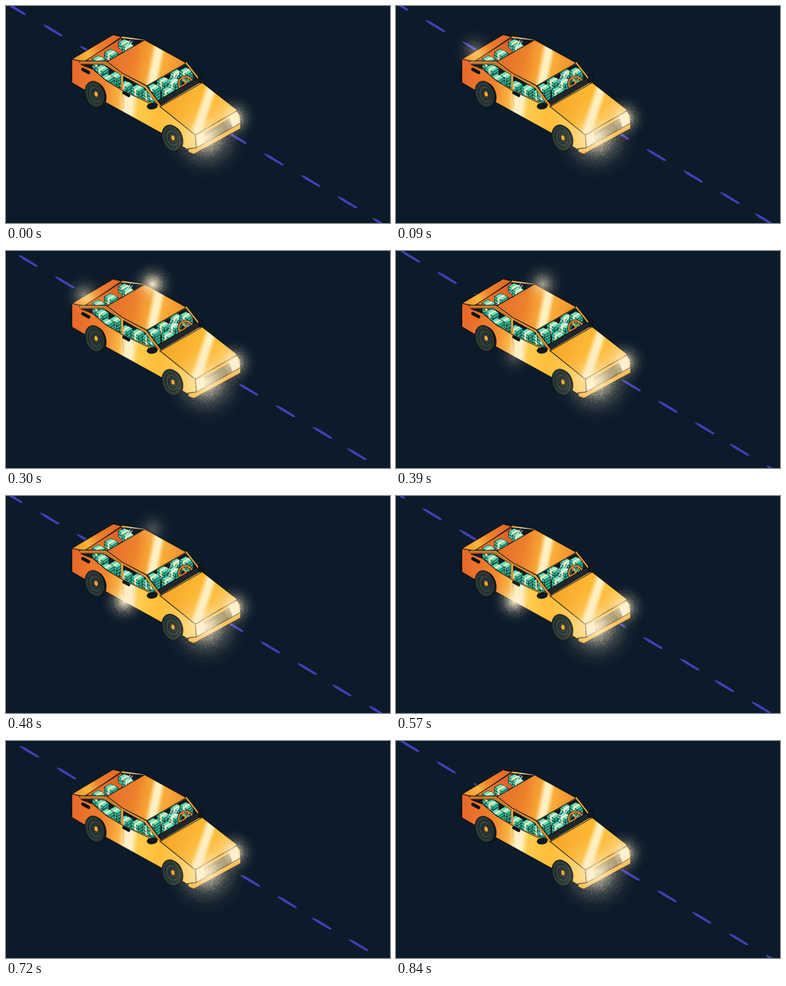
Recreate the animation shown at these times as an HTML page with a canvas. Size 720x407 px, loop 0.87 s.

```html
<!DOCTYPE html>
<html>
<head>
<meta charset="utf-8">
<style>
html, body { margin: 0; width: 100%; height: 100%; overflow: hidden; background: #0c1b2a; }
canvas { display: block; }
</style>
</head>
<body>
<canvas id="stage" width="720" height="407"></canvas>
<script>
const LOOP = 870, STEP = 30, INK = '#0b1015';
const stage = document.getElementById('stage').getContext('2d');

function layer(w, h) {
  const canvas = document.createElement('canvas');
  canvas.width = w;
  canvas.height = h;
  return canvas.getContext('2d');
}

let seed = 7;
function random() {
  seed = (seed * 16807) % 2147483647;
  return seed / 2147483647;
}

// Soft light with a grainy edge
function makeGlow(r) {
  const g = layer(r * 2, r * 2);
  const soft = g.createRadialGradient(r, r, 0, r, r, r);
  soft.addColorStop(0, 'rgba(255,243,212,.85)');
  soft.addColorStop(.25, 'rgba(255,238,200,.5)');
  soft.addColorStop(.5, 'rgba(245,226,188,.17)');
  soft.addColorStop(.75, 'rgba(240,220,180,.04)');
  soft.addColorStop(1, 'rgba(240,220,180,0)');
  g.fillStyle = soft;
  g.fillRect(0, 0, r * 2, r * 2);
  for (let i = 0; i < r * r * .8; i++) {
    const d = random() ** .8, a = random() * Math.PI * 2;
    g.fillStyle = `rgba(255,238,200,${.5 * (1 - d) ** 1.9})`;
    g.fillRect(Math.round(r + Math.cos(a) * d * r), Math.round(r + Math.sin(a) * d * r), 1, 1);
  }
  return g.canvas;
}

const car = layer(720, 407);

function gradient(x0, y0, x1, y1, stops) {
  const g = car.createLinearGradient(x0, y0, x1, y1);
  for (const [at, color] of stops) g.addColorStop(at, color);
  return g;
}

function shape(d, fill, stroke = INK, width = 1.3) {
  const path = new Path2D(d);
  if (fill) {
    car.fillStyle = fill;
    car.fill(path);
  }
  if (stroke) {
    car.strokeStyle = stroke;
    car.lineWidth = width;
    car.stroke(path);
  }
}

function oval(x, y, rx, ry, angle, fill, stroke = INK, width = 1.3) {
  car.beginPath();
  car.ellipse(x, y, rx, ry, angle, 0, Math.PI * 2);
  car.fillStyle = fill;
  car.fill();
  car.strokeStyle = stroke;
  car.lineWidth = width;
  car.stroke();
}

function wheel(x, y) {
  oval(x + 4, y + 1, 16.5, 24, -.3, '#18211f');
  oval(x, y, 17.5, 25, -.3, '#2b3936');
  oval(x + 1, y, 12, 17, -.3, '#34423e', INK, 1);
  oval(x + 2, y, 8, 11, -.3, '#2b3936', INK, 1);
  oval(x + 2.5, y - .5, 3.8, 5.5, -.3, '#f6a52f', INK, 1);
}

function cash(x, y, layers) {
  car.save();
  car.translate(x, y + layers * 5.5);
  for (let i = 0; i < layers; i++) {
    car.translate(0, -5.5);
    shape('M-12 0L2 8V13.5L-12 5.5Z', '#3cc9a3', INK, .8);
    shape('M2 8L13 1V6.5L2 13.5Z', '#2fae8e', INK, .8);
    shape('M-12 0L-1 -6L13 1L2 8Z', '#63e3be', INK, .8);
    shape('M-6.5 3L4.5 -3.2L8 -1.5L-3 5V10.5L-6.5 8.5Z', '#f8e9be', null);
  }
  car.restore();
}

function drawCar() {
  car.lineJoin = car.lineCap = 'round';
  const side = gradient(124, 150, 357, 173, [[0, '#e7682a'], [.25, '#f0822d'], [.38, '#fab343'],
    [.44, '#fff0c4'], [.49, '#fff0c4'], [.54, '#ffcb4c'], [.72, '#ffbe3a'], [1, '#ffd268']]);
  const roof = gradient(190, 80, 340, 110, [[0, '#e36c2a'], [.35, '#ec812c'], [.53, '#f7a434'],
    [.59, '#fff0c0'], [.65, '#fff0c0'], [.7, '#faae39'], [1, '#ee8a2e']]);
  const hood = gradient(300, 180, 430, 223, [[0, '#f7a82d'], [.43, '#fdb932'], [.5, '#fff0c0'],
    [.56, '#fff0c0'], [.62, '#ffbc36'], [1, '#ffd076']]);
  const trunk = gradient(130, 100, 205, 55, [[0, '#f5942e'], [.3, '#fdb63c'], [.55, '#ee812d'], [1, '#e26a29']]);

  // Shell
  shape('M120.5 121L126 124V142L121 137Z', '#10171b');
  shape('M123.5 99L201 53L260 62L338 105L361 133L368 142L432 193L439 204L440 228L352 276L341 269L292 238L187 180L123.5 143Z', side);
  shape('M123.5 99L201 53L217 57L148 104Z', trunk);

  // Windows and cargo
  const windows = [
    'M149 102L215 60L258 64L187 104Z',
    'M142 109L184 109L215 129L216 154L189 139L163 117Z',
    'M220 131L260 153L284 185L267 178L220 157Z',
    'M263 151L336 109L366 141L289 186Z'
  ];
  shape(windows[0], gradient(165, 100, 245, 62, [[0, '#ed7b2c'], [.7, '#d95f29'], [.72, '#10191f'], [1, '#10191f']]));
  for (const w of windows.slice(1)) shape(w, '#121b20');
  car.save();
  const glass = new Path2D();
  for (const w of windows) glass.addPath(new Path2D(w));
  car.clip(glass);
  for (const [x, y, n] of [
    [223, 67, 2], [230, 74, 2], [197, 86, 2], [174, 98, 4], [180, 115, 2],
    [206, 128, 3], [190, 132, 2], [225, 145, 3], [247, 152, 3], [268, 160, 4],
    [320, 123, 3], [338, 120, 3], [295, 137, 3], [316, 139, 3], [277, 150, 4], [304, 156, 3]
  ]) cash(x, y, n);
  oval(337, 145, 13, 13, 0, 'rgba(0,0,0,0)', INK, 5);
  oval(337, 145, 13, 13, 0, 'rgba(0,0,0,0)', '#f08b2e', 2.8);
  shape('M337 145L331 134M337 145L343 134M337 145L326 151', null, '#f08b2e', 2);
  shape('M286 176L361 133L370 143L289 188Z', '#20262a');
  shape('M305 151L321 122M311 146L324 125M303 143L312 127M226 74L233 63M231 74L237 65', null, 'rgba(255,255,255,.75)', 1.5);
  car.restore();

  // Roof, pillars and hood
  shape('M187 105L260 63L338 106L262 150L218 128Z', roof);
  shape('M139 104L187 104L218 127L263 150L290 187', null, INK, 4.5);
  shape('M139 104.5L187 104.5L218 127.5L262 150.5L289.5 187', null, '#f39530', 2.7);
  shape('M218 129V157', null, '#f6a23a', 3);
  shape('M338 106L363 138', null, INK, 4.5);
  shape('M338 106L363 138', null, '#f9a733', 2.7);
  shape('M140 109L163 118L189 140L219 158L268 181', null);
  shape('M218 158L221 191', null, 'rgba(120,65,20,.35)', .8);
  shape('M289 188L368 143L432 193Q434 196 430 198L357 240Q354 241 351 238Z', hood);

  // Nose
  shape('M355 241L432 196L439 204L440 222L357 269Z', '#ffc04a');
  shape('M372 238L419 211L425 225L375 255Z', '#a89567', INK, .7);
  for (let i = 1; i < 6; i++)
    shape(`M${372 + i * .5} ${238 + i * 2.8}L${419 + i} ${211 + i * 2.4}`, null, '#4b4a40', 1);
  shape('M357 242L371 236L375 258L359 266Z', '#fff6dc', null);
  shape('M418 208L434 198L438 217L425 227Z', '#fff6dc', null);
  shape('M341 267L357 265L440 219V229L352 277L342 273Z', '#fcb63b');

  // Fittings
  shape('M144 118L155 124M221 162L230 167', null, INK, 6);
  oval(274, 187, 9.5, 5.5, -.1, '#10191f');
  oval(365, 136, 4.5, 7.5, .3, '#10191f');
  wheel(166.5, 165);
  wheel(310.5, 247);
}

function drawRoad(t) {
  stage.fillStyle = '#0c1b2a';
  stage.fillRect(0, 0, 720, 407);
  stage.fillStyle = stage.strokeStyle = '#423fb9';
  stage.lineJoin = 'round';
  const dash = new Path2D('M1 0L10 3.5L35 19L36 21L33 21.5L9 7.5L1 1.5Z');
  for (let k = -8; k < 7; k++) {
    const along = k * 69 - t * .157;
    stage.save();
    stage.translate(484 + along - (k > 2 ? 4 : 0), 277 + along * .584);
    stage.fill(dash);
    stage.stroke(dash);
    stage.restore();
  }
}

const small = makeGlow(46), wide = makeGlow(82);

function shine(sprite, x, y, alpha = 1) {
  stage.globalAlpha = alpha;
  stage.drawImage(sprite, Math.round(x - sprite.width / 2), Math.round(y - sprite.height / 2));
  stage.globalAlpha = 1;
}

// Rises from start to peak, holds until fade, gone at end
const pulse = (t, start, peak, fade, end) =>
  Math.max(0, Math.min(1, (t - start) / (peak - start), (end - t) / (end - fade)));

function frame(now) {
  const t = Math.floor(now % LOOP / STEP) * STEP;
  const bob = .8 * Math.cos(t / LOOP * Math.PI * 2);
  drawRoad(t);
  stage.drawImage(car.canvas, 0, bob);
  shine(wide, 375, 245 + bob);
  shine(small, 427, 209 + bob);
  shine(small, 147, 83, pulse(t, 60, 150, 210, 390));
  shine(small, 275, 62, pulse(t, 90, 210, 300, 540));
  shine(small, 222, 197, pulse(t, 360, 480, 570, 690));
  requestAnimationFrame(frame);
}

drawCar();
requestAnimationFrame(frame);
</script>
</body>
</html>
```
